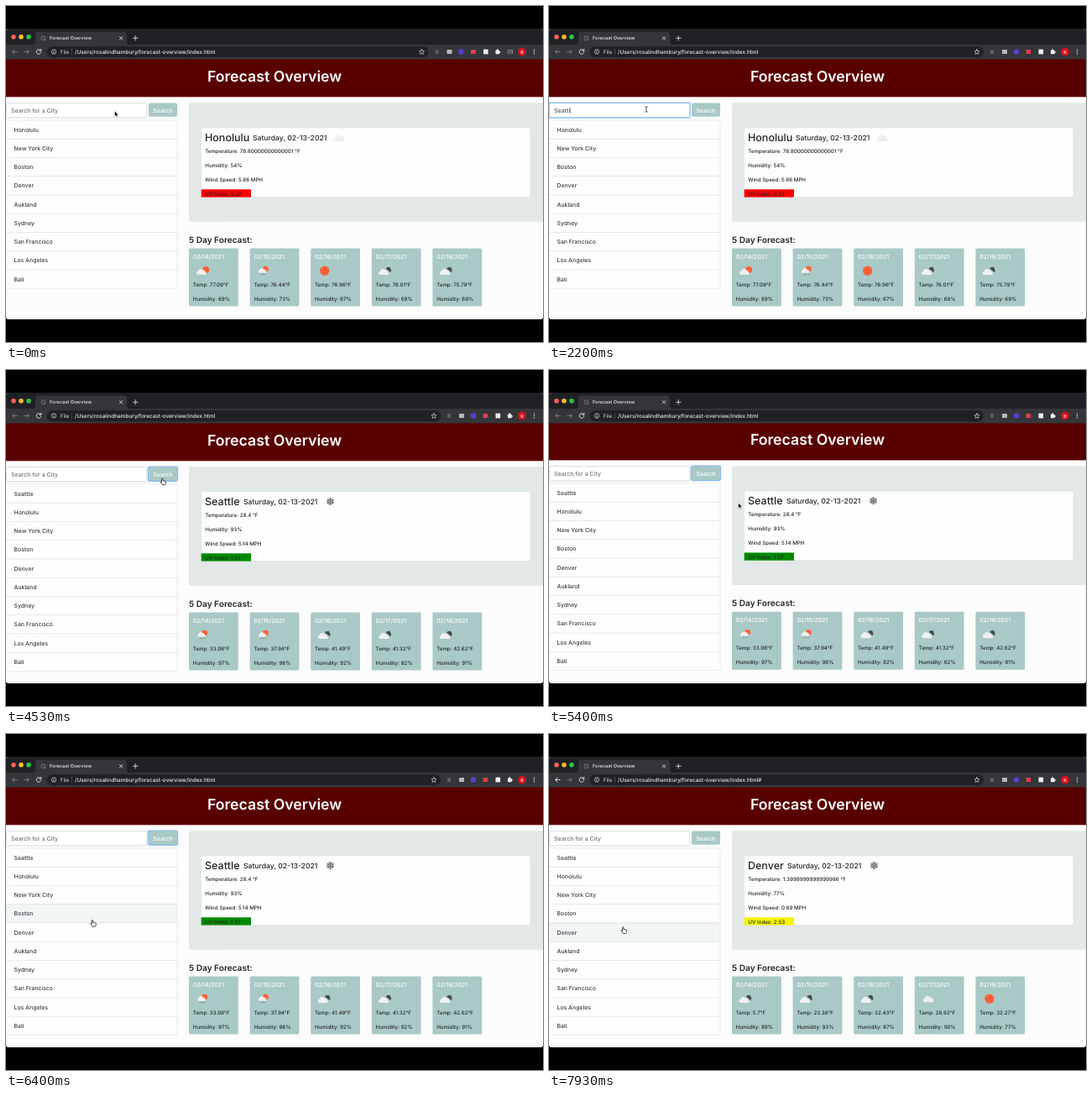
An HTML page for the animation above (8 s loop, 640 px wide and 400 px high).

```html
<!DOCTYPE html>
<html lang="en">
<head>
<meta charset="utf-8">
<title>Forecast Overview</title>
<style>
html, body { margin: 0; width: 100%; height: 100%; overflow: hidden; background: #000; }
svg { display: block; width: 100vw; height: 100vh; font-family: Inter, "Open Sans", sans-serif; font-weight: 450; text-rendering: geometricPrecision; }
</style>
</head>
<body>
<svg id="stage" viewBox="0 0 640 400"></svg>
<script>
const LOOP = 8000;
const SEARCH = 3700, DENVER = 7250;
const TEAL = '#a9c9c6', INK = '#212529', SUN = '#fb5f39';
const TITLE = 'Forecast Overview';
const PATH = '/Users/rosalindhambury/forecast-overview/index.html';
const CITIES = ['Honolulu', 'New York City', 'Boston', 'Denver', 'Aukland', 'Sydney', 'San Francisco', 'Los Angeles', 'Bali'];

const REPORTS = [
  { city: 'Honolulu', dateX: 294, iconX: 397.5, icon: 'cloud', temp: '78.80000000000001', hum: 54, wind: 5.66, uv: '9.27', tint: '#f00',
    days: [['77.09', 69, 'sunCloud'], ['76.44', 73, 'shower'], ['76.96', 67, 'sun'], ['76.01', 69, 'broken'], ['75.79', 69, 'broken']] },
  { city: 'Seattle', dateX: 283, iconX: 386.5, icon: 'flake', temp: '28.4', hum: 93, wind: 5.14, uv: '1.57', tint: '#008a00',
    days: [['33.06', 97, 'shower'], ['37.94', 98, 'shower'], ['41.49', 92, 'broken'], ['41.32', 82, 'broken'], ['42.62', 91, 'broken']] },
  { city: 'Denver', dateX: 284, iconX: 387.5, icon: 'flake', temp: '1.3999999999999986', hum: 77, wind: 0.89, uv: '2.53', tint: '#f5f500',
    days: [['5.7', 89, 'broken'], ['23.38', 93, 'broken'], ['32.43', 87, 'broken'], ['28.92', 90, 'cloud'], ['32.27', 77, 'sun']] }
];

// time, x, y of the pointer's hot spot
const TRAIL = [
  [0, 129.5, 125], [500, 116, 123], [2500, 116, 123], [3300, 186.3, 128.9], [4700, 186.3, 128.9],
  [5450, 226, 158.5], [5850, 226, 158.5], [6380, 103, 221.4], [6500, 103, 221.4], [7000, 88.2, 229.7], [LOOP, 88.2, 229.7]
];

const ease = p => p * p * (3 - 2 * p);
const ramp = (t, a, b) => ease(Math.min(1, Math.max(0, (t - a) / (b - a))));

const rect = (x, y, w, h, fill, r = 0, extra = '') =>
  `<rect x="${x}" y="${y}" width="${w}" height="${h}" rx="${r}" fill="${fill}" ${extra}/>`;
const dot = (x, y, r, fill, extra = '') => `<circle cx="${x}" cy="${y}" r="${r}" fill="${fill}" ${extra}/>`;
const line = (d, color, w = 1) =>
  `<path d="${d}" fill="none" stroke="${color}" stroke-width="${w}" stroke-linecap="round" stroke-linejoin="round"/>`;
const group = (x, y, body, s = 1, turn = 0) => `<g transform="translate(${x} ${y}) rotate(${turn}) scale(${s})">${body}</g>`;
// y is the middle of the capitals
const text = (x, y, size, str, fill = INK, extra = '') =>
  `<text x="${x}" y="${(y + size * 0.364).toFixed(2)}" font-size="${size}" fill="${fill}" ${extra}>${str}</text>`;

const cloud = (x, y, s, fill, turn) => group(x, y,
  `<path d="M-6 4a2.6 2.6 0 0 1 .4-5.1 4 4 0 0 1 7.4-1.2 3 3 0 0 1 3.4 3 1.7 1.7 0 0 1 .3 3.3z" fill="${fill}"/>`, s, turn);

const ICONS = {
  cloud: cloud(0.5, 0.5, 0.9, '#ededed'),
  sun: dot(0, 0, 5.6, SUN),
  sunCloud: dot(3.6, -1.2, 4, SUN) + cloud(-1, 1.2, 0.82, '#f0f0f0'),
  broken: cloud(4.6, -1.7, 0.5, '#484848', 38) + cloud(-1.4, 1.4, 0.85, '#f0f0f0'),
  shower: dot(2.2, -2, 3.4, SUN) + cloud(-1, -0.2, 0.68, '#f0f0f0') +
    line('M-2.6 3.4l-.7 1.4M0 3.4l-.7 1.4M2.6 3.2l-.7 1.4', '#6a6a6a', 0.7),
  flake: [0, 60, 120].map(a => group(0, 0, line('M0-4.3V4.3M-1.5-3.8L0-2.5 1.5-3.8M-1.5 3.8L0 2.5 1.5 3.8', '#484848', 0.65), 1, a)).join('') +
    dot(0, 0, 2.3, 'none', 'stroke="#484848" stroke-width=".55"')
};

const POINTERS = {
  arrow: '<path d="M0 0V6.6L1.6 5.2 2.6 7.4 3.7 6.9 2.7 4.8H4.7Z" fill="#000" stroke="#fff" stroke-width=".5"/>',
  ibeam: line('M-1.3-3.3Q0-3.3 0-2.4V2.4Q0 3.3-1.3 3.3M1.3-3.3Q0-3.3 0-2.4M0 2.4Q0 3.3 1.3 3.3', '#222', 0.75),
  hand: '<path d="M-.7.5Q0-.5.7.5V3Q1.4 2.5 1.9 3.1 2.6 2.7 3.1 3.3 4.2 3 4.2 4.2V5.6Q4.2 6.8 3.3 7.8H0Q-.8 6.6-2 5.1-2.6 3.9-1.5 3.9L-.7 4.6Z" fill="#fff" stroke="#111" stroke-width=".75" stroke-linejoin="round"/>'
};

function pointerAt(t) {
  const i = Math.max(1, TRAIL.findIndex(k => k[0] > t));
  const [t0, x0, y0] = TRAIL[i - 1], [t1, x1, y1] = TRAIL[i];
  const p = ease((t - t0) / (t1 - t0));
  return { x: x0 + (x1 - x0) * p, y: y0 + (y1 - y0) * p };
}

function pointerKind(t, { x, y }, listEnd) {
  if (t < 250) return 'arrow';
  const inForm = y > 115 && y < 133;
  if (inForm && x < 168) return 'ibeam';
  if (inForm && x > 170 && x < 204) return 'hand';
  return x < 204 && y > 136 && y < listEnd ? 'hand' : 'arrow';
}

function form(t) {
  const focus = t > 600 && t < SEARCH - 80;
  const pressed = t >= SEARCH - 80 && t < DENVER;
  const typed = t < SEARCH ? 'Seattle'.slice(0, Math.max(0, Math.floor((t - 1250) / 175) + 1)) : '';
  const idle = t < 1250 ? t - 600 : Math.max(0, t - 2300);
  const caret = focus && idle % 1000 < 500 ? '<tspan dx="-.9" font-weight="300">|</tspan>' : '';
  const border = focus ? '#73b4f5' : '#ced4da';
  let s = focus ? rect(-1, 114.3, 170, 19.7, '#b4d7fb', 2) : '';
  s += rect(0.3, 115.6, 167.5, 17.2, '#fff', 1.6, `stroke="${border}" stroke-width=".8"`);
  s += typed ? text(6, 124.5, 7, typed + caret, '#495057') : text(6, 124.5, 7, 'Search for a City', '#6c757d') + (caret && text(6, 124.5, 7, caret));
  if (pressed) s += rect(168.8, 114.4, 36.4, 18.6, '#86bdf0', 2.4);
  s += rect(170, 115.6, 34, 16.2, TEAL, 1.7);
  return s + text(187, 124, 7, 'Search', '#fff', 'text-anchor="middle"');
}

function list(cities, mouse, scroll) {
  const step = 22.25, over = mouse.x < 204 ? Math.floor((mouse.y + scroll - 136) / step) : -1;
  return cities.map((c, i) => {
    const y = 136 + i * step;
    return rect(-1, y, 205, step, i === over ? '#f1f5f5' : '#fdfdfd', i ? 0 : 1.5, 'stroke="#e0e2e3" stroke-width=".6"') +
      text(9.5, y + 11.1, 6.9, c, '#383f45');
  }).join('');
}

function report(r) {
  let s = rect(218, 115.3, 425, 141.5, '#e2e8e7', 2.5);
  s += rect(232.7, 145, 392.3, 82.6, '#fdfdfd', 1.5, 'stroke="#d8dcdc" stroke-width=".5"');
  s += text(237, 156.3, 12.5, r.city) + text(r.dateX, 156.7, 8.6, 'Saturday, 02-13-2021') + group(r.iconX, 156.6, ICONS[r.icon]);
  s += rect(232.7, 218.3, 59.3, 9.3, r.tint);
  [`Temperature: ${r.temp} °F`, `Humidity: ${r.hum}%`, `Wind Speed: ${r.wind} MPH`, `UV Index: ${r.uv}`]
    .forEach((str, i) => s += text(237.3, 173 + i * 16.75, 6.22, str));
  s += text(218, 278.6, 10.1, '5 Day Forecast:', INK, 'font-weight="600"');
  r.days.forEach(([temp, hum, icon], i) => {
    const x = 218 + i * 72.6;
    s += rect(x, 288.6, 58.8, 69, TEAL, 1.5) + text(x + 4.8, 298.7, 6.95, `02/${14 + i}/2021`, '#fff') +
      group(x + 16.5, 315.2, ICONS[icon]) +
      text(x + 4.8, 331.7, 6.2, `Temp: ${temp}°F`) + text(x + 4.8, 348.6, 6.2, `Humidity: ${hum}%`);
  });
  return s;
}

function browser(t) {
  const light = '#d8dadd', dim = '#77797d', wide = t < 900;
  const shift = wide ? -14.5 : 0;
  let s = rect(0, 27, 640, 20, '#202124') + rect(0, 46, 640, 17.4, '#35363a');
  ['#ff5f57', '#febc2e', '#28c840'].forEach((c, i) => s += dot(9 + i * 9, 36.8, 2.8, c));
  s += '<path d="M31 46.5Q35 46 35 42V34Q35 30.5 38.5 30.5H140.5Q144 30.5 144 34V42Q144 46 148 46.5Z" fill="#35363a"/>';
  s += dot(44.5, 38.3, 2.6, 'none', `stroke="${dim}" stroke-width=".9"`) + line('M42.7 36.5L46.3 40.1', dim, 0.8);
  s += text(52, 38.3, 5.6, TITLE, '#e8eaed');
  s += line('M135.3 36.6L138.7 40M138.7 36.6L135.3 40M151.5 38.3H157M154.2 35.5V41', light, 0.9);

  s += line('M13 54.5H7.5M10 52L7.5 54.5 10 57', t >= DENVER ? light : dim, 1);
  s += line('M21.8 54.5H27.3M24.8 52L27.3 54.5 24.8 57', dim, 1);
  s += line('M41.3 52.8A2.8 2.8 0 1 0 41.8 55M41.8 51.3V53.3H39.8', light, 1);
  s += rect(48.5, 48, 469.5 + shift, 13.2, '#202124', 6.6);
  s += dot(57, 54.5, 2.7, 'none', `stroke="${light}" stroke-width=".75"`) + line('M57 54.3V55.9M57 53V53.1', light, 0.8);
  s += text(64.7, 54.6, 6.3, 'File', '#bdc1c6') + line('M78.4 51.5V57.5', '#5f6368', 0.6);
  s += text(82, 54.6, 6.45, PATH + (t >= DENVER ? '#' : ''), '#e8eaed');
  s += group(510 + shift, 54.6, line('M0-3L.9-1 3-.8 1.4.7 1.9 2.8 0 1.7-1.9 2.8-1.4.7-3-.8-.9-1Z', light, 0.7));

  const tools = rect(526, 52.2, 4, 4.6, '#5c5e63') + rect(540, 52, 6, 5, '#b4b7bb', 0.5) + dot(557, 54.5, 3.2, '#5a3fd0') +
    rect(568.6, 52, 5.6, 5, '#e0404a') + rect(583.5, 51.6, 5.6, 5.8, '#eceded') +
    rect(598, 52.7, 4.6, 4.6, '#eceded', 0.6) + dot(600.2, 52.4, 1.1, '#eceded') + dot(602.8, 55, 1.1, '#eceded');
  s += group(shift, 0, tools);
  if (wide) s += line('M598 52.5H603.5M598 54.5H603.5M598 56.5H600.5M602.5 56.5H603.5V53', '#9a9ca0', 0.8);
  s += dot(615, 54.5, 4.9, '#d50f1c') + text(615, 54.6, 5.4, 'R', '#fff', 'text-anchor="middle"');
  [-2.4, 0, 2.4].forEach(d => s += dot(629.5, 54.5 + d, 0.75, light));
  return s;
}

function render(t) {
  const scroll = 4 * (ramp(t, 5350, 5520) - ramp(t, 5900, 6040));
  const mouse = pointerAt(t);
  const cities = t < SEARCH ? CITIES : ['Seattle', ...CITIES];
  const now = REPORTS[t < SEARCH + 170 ? 0 : t < DENVER + 200 ? 1 : 2];
  const kind = pointerKind(t, mouse, 136 + cities.length * 22.25 - scroll);

  const page = rect(0, 60, 640, 48.3, '#590000') +
    text(320, 83.6, 17.7, TITLE, '#fff', 'text-anchor="middle" font-weight="600"') +
    form(t) + list(cities, mouse, scroll) + report(now);

  return '<clipPath id="win"><rect y="27" width="640" height="346" rx="3"/></clipPath>' +
    rect(0, 0, 640, 400, '#000') +
    `<g clip-path="url(#win)">${rect(0, 27, 640, 346, '#fcfcfc')}${group(0, -scroll, page)}${browser(t)}</g>` +
    group(mouse.x, mouse.y, POINTERS[kind]);
}

const stage = document.getElementById('stage');
let shown = '';
function tick() {
  const next = render(performance.now() % LOOP);
  if (next !== shown) stage.innerHTML = shown = next;
  requestAnimationFrame(tick);
}
tick();
</script>
</body>
</html>
```
